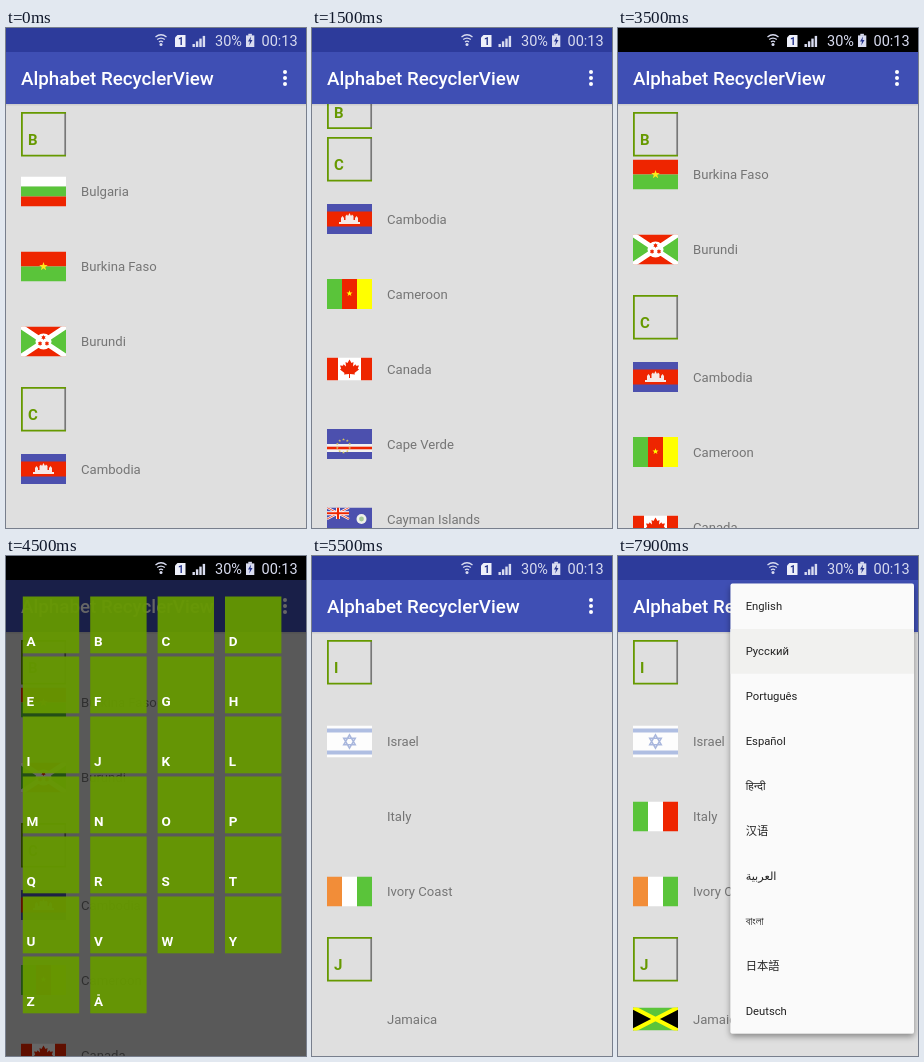
An HTML page that plays this animation: 300x500 px, repeating every 8 s.

```html
<!DOCTYPE html>
<html lang="en">
<head>
<meta charset="utf-8">
<title>Alphabet list</title>
<style>
  html, body { margin: 0; width: 100%; height: 100%; overflow: hidden; background: #dfdfdf; }
  svg { display: block; width: 100vw; height: 100vh; }
  text { font-family: Roboto, "Noto Sans", "Noto Sans CJK SC", "Noto Sans CJK JP", sans-serif; }
  .title { font-size: 18.75px; font-weight: 500; fill: #fff; }
  .country { font-size: 13.125px; fill: #757575; }
  .letter { font-size: 15px; font-weight: 700; fill: #669900; }
  .cell { font-size: 13.5px; font-weight: 700; fill: #fff; }
  .item { font-size: 11.25px; fill: #222; }
  .status { font-size: 14.5px; fill: #d9dcf0; }
</style>
</head>
<body>
<svg id="stage" viewBox="0 0 300 500"></svg>
<script>
const LOOP = 8000, STEP = 100;
const ROW = 75, HEADER = 52.5, LIST_TOP = 76;
const RED = '#ee2500', GREEN = '#5ac43a', BLUE = '#4c50ae', YELLOW = '#ffff00', LIME = '#669900';

const rect = (x, y, w, h, fill, extra = '') =>
  `<rect x="${x}" y="${y}" width="${w}" height="${h}" fill="${fill}" ${extra}/>`;
const path = (d, fill, extra = '') => `<path d="${d}" fill="${fill}" ${extra}/>`;
const circle = (x, y, r, fill, extra = '') => `<circle cx="${x}" cy="${y}" r="${r}" fill="${fill}" ${extra}/>`;
const text = (x, y, cls, str) => `<text x="${x}" y="${y}" class="${cls}">${str}</text>`;
const bands = (h, ...fills) => fills.map((f, i) => rect(0, i * h, 45, h, f)).join('');
const pales = (...fills) => fills.map((f, i) => rect(i * 15, 0, 15, 30, f)).join('');

function star(cx, cy, r, fill, points = 5, inner = 0.4) {
  const at = Array.from({ length: points * 2 }, (_, i) => {
    const a = i * Math.PI / points - Math.PI / 2, d = i % 2 ? r * inner : r;
    return (cx + d * Math.cos(a)).toFixed(2) + ' ' + (cy + d * Math.sin(a)).toFixed(2);
  });
  return path(`M${at.join('L')}Z`, fill);
}
const ring = (n, draw) => Array.from({ length: n }, (_, i) => {
  const a = i * 2 * Math.PI / n - Math.PI / 2;
  return draw(Math.cos(a), Math.sin(a));
}).join('');

// Each flag is 45 wide; the number is its height.
const flags = {
  'Bulgaria': [30, bands(10, '#fff', GREEN, RED)],
  'Burkina Faso': [30, bands(15, RED, GREEN) + star(22.5, 15, 4.5, '#ffe81a')],
  'Burundi': [30, rect(0, 0, 45, 30, RED) + path('M0 0L22.5 15L0 30ZM45 0L22.5 15L45 30Z', GREEN) +
    path('M0 0L45 30M45 0L0 30', 'none', 'stroke="#fff" stroke-width="5"') +
    circle(22.5, 15, 8, '#fff') + ring(3, (x, y) => star(22.5 + 4 * x, 15 + 4 * y, 2.4, RED, 6, 0.58))],
  'Cambodia': [30, rect(0, 0, 45, 30, BLUE) + rect(0, 7.5, 45, 15, RED) +
    path('M12 20V18H14V14L15.5 12L17 14V16H18.5V12L20 10.5L21 12L22.5 9L24 12L25 10.5L26.5 12V16H28V14L29.5 12L31 14V18H33V20Z', '#f6e9e6')],
  'Cameroon': [30, pales(GREEN, RED, YELLOW) + star(22.5, 14.5, 3.2, YELLOW)],
  'Canada': [23, rect(0, 0, 45, 23, '#fff') + rect(0, 0, 11, 23, RED) + rect(34, 0, 11, 23, RED) +
    path('M22.5 2L24.5 5.5L26.5 4.5L26 9L28.5 6.8L29 8.2L32 8L30.8 11L32 12L27.5 15.5L28 17L23 16.5V20.5H22V16.5L17 17L17.5 15.5L13 12L14.2 11L13 8L16 8.2L16.5 6.8L19 9L18.5 4.5L20.5 5.5Z', RED)],
  'Cape Verde': [30, rect(0, 0, 45, 30, BLUE) + rect(0, 15, 45, 8, '#f2f2f2') + rect(0, 17.7, 45, 2.6, RED) +
    ring(10, (x, y) => star(16.5 + 6.5 * x, 17 + 6.5 * y, 1.5, '#d9c95a'))],
  'Cayman Islands': [23, rect(0, 0, 45, 23, BLUE) +
    path('M0 0L22 11.5M22 0L0 11.5', 'none', 'stroke="#fff" stroke-width="2.4"') +
    path('M0 0L22 11.5M22 0L0 11.5', 'none', `stroke="${RED}" stroke-width=".8"`) +
    path('M11 0V11.5M0 5.75H22', 'none', 'stroke="#fff" stroke-width="4"') +
    path('M11 0V11.5M0 5.75H22', 'none', `stroke="${RED}" stroke-width="2.2"`) +
    circle(34.5, 11.5, 5, '#eef0ea') + circle(34.5, 11.5, 2.4, '#a5c89a')],
  'Israel': [32, rect(0, 0, 45, 32, '#fdfdfd') + rect(0, 3, 45, 4, '#afbee2') + rect(0, 25, 45, 4, '#afbee2') +
    path('M22.5 9.3L28.3 19.3H16.7ZM22.5 22.7L28.3 12.7H16.7Z', 'none', 'stroke="#a9b7dd" stroke-width="1.5"')],
  'Italy': [30, pales(GREEN, '#fff', RED)],
  'Ivory Coast': [30, pales('#f28d38', '#fff', GREEN)],
  'Jamaica': [23, rect(0, 0, 45, 23, GREEN) + path('M0 0L22.5 11.5L0 23ZM45 0L22.5 11.5L45 23Z', '#000') +
    path('M0 0L45 23M45 0L0 23', 'none', `stroke="${YELLOW}" stroke-width="4.2"`)],
};

const sections = {
  bc: [['B', ['Bulgaria', 'Burkina Faso', 'Burundi']],
       ['C', ['Cambodia', 'Cameroon', 'Canada', 'Cape Verde', 'Cayman Islands']]],
  ij: [['I', ['Israel', 'Italy', 'Ivory Coast']], ['J', ['Jamaica']]],
};

const flagId = name => 'flag-' + name.replace(/ /g, '');
const row = (name, y) => {
  const [h, art] = flags[name];
  return `<svg id="${flagId(name)}" x="15" y="${y - h / 2}" width="45" height="${h}">${art}</svg>` +
    text(75, y + 4.7, 'country', name);
};
const header = (id, letter) => `<g id="${id}">` + rect(0, 0, 300, HEADER, '#dfdfdf') +
  path('M59.2 8V52', 'none', 'stroke="#777" stroke-width="1.7"') +
  path('M60 8.9H15.9V51.6H60', 'none', `stroke="${LIME}" stroke-width="1.8"`) +
  text(22, 41, 'letter', letter) + '</g>';

// Rows are placed from the centre of the first one; the second header follows the first section.
function list(id) {
  const [[a, first], [b, second]] = sections[id];
  const start = first.length * ROW + HEADER;
  return `<g id="${id}"><g id="${id}-rows">` +
    first.map((n, i) => row(n, i * ROW)).join('') +
    second.map((n, i) => row(n, start + i * ROW)).join('') +
    '</g>' + header(id + '-next', b) + header(id + '-pinned', a) + '</g>';
}

const statusBar = rect(0, 0, 300, 24, '#2d3b9b', 'id="status"') +
  '<g fill="none" stroke="#d9dcf0" stroke-width="1.3">' +
  '<path d="M149.5 9Q155 4.5 160.5 9M151.2 11.6Q155 8.6 158.8 11.6M153 14Q155 12.4 157 14"/></g>' +
  circle(155, 16.6, 1.5, '#d9dcf0') +
  path('M171.5 7H179.5V19H169V9.5Z', '#eef0fa') +
  '<text x="172" y="16.8" font-size="10" font-weight="700" fill="#26348c">1</text>' +
  [0, 1, 2, 3].map(i => rect(186.5 + i * 3.4, 16 - i * 2.7, 2.4, 3 + i * 2.7, '#d9dcf0')).join('') +
  text(209, 18, 'status', '30%') +
  rect(242.3, 5.8, 3.6, 2, '#d9dcf0') + rect(240, 7.4, 8.3, 11.6, '#d9dcf0') +
  path('M245 8.5L242 13.5H244L243.2 17.5L246.5 12H244.5Z', '#26348c') +
  text(255.5, 18, 'status', '00:13');

const toolbar = rect(0, 76, 300, 1.5, '#000', 'opacity=".08"') + rect(0, 24, 300, 52, '#3f4fb4') +
  text(15, 57, 'title', 'Alphabet RecyclerView') +
  [44, 50, 56].map(y => circle(279, y, 2, '#fff')).join('');

const cells = [...'ABCDEFGHIJKLMNOPQRSTUVWYZÅ'].map((c, i) => {
  const x = 16.8 + i % 4 * 67.4, y = 40.5 + Math.floor(i / 4) * 60;
  return rect(x, y, 56.4, 56.8, LIME, 'fill-opacity=".94"') + text(x + 3.8, y + 49.3, 'cell', c);
}).join('');

const languages = ['English', 'Русский', 'Português', 'Español', 'हिन्दी', '汉语', 'العربية', 'বাংলা', '日本語', 'Deutsch'];
const menu = rect(112.5, 27.5, 183.5, 450, '#fafafa', 'rx="2" filter="url(#shadow)"') +
  rect(112.5, 73, 183.5, 44.7, '#f1f1ef') +
  languages.map((s, i) => text(127.7, 54 + i * 45, 'item', s)).join('');

const stage = document.getElementById('stage');
stage.innerHTML = '<defs><filter id="shadow" x="-10%" y="-10%" width="120%" height="120%">' +
  '<feDropShadow dx="0" dy="3" stdDeviation="3" flood-opacity=".4"/></filter></defs>' +
  rect(0, 0, 300, 500, '#dfdfdf') + list('bc') + list('ij') +
  rect(296, 0, 4, 8.5, '#a6a6a6', 'id="thumb"') + toolbar +
  rect(0, 24, 300, 476, '#000', 'id="dim"') + statusBar +
  `<g id="dialog">${cells}</g><g id="menu">${menu}</g>`;

// Time / value tables, linear between entries.
const scroll = [[600, 163.5], [700, 135], [800, 55], [900, -15], [1000, -57], [1100, -79], [1200, -86.5],
  [1500, -86.5], [2300, 34], [2400, 45], [2500, 49], [2600, 49], [2900, 71.5]];
const thumbFade = [[600, 0], [700, 1], [1200, 1], [1500, 0], [1600, 1], [3000, 1], [3300, 0]];
const dialogFade = [[3600, 0], [3900, 1], [5200, 1], [5500, 0]];
const menuFade = [[7000, 0], [7300, 1]];
const menuGrow = [[7000, 0.8], [7200, 0.94], [7400, 1]];
const flagFade = { 'Italy': [[5500, 0], [5700, 1]], 'Jamaica': [[5600, 0], [5900, 1]] };

function sample(table, t) {
  const i = table.findIndex(([time]) => time > t);
  if (i === 0) return table[0][1];
  if (i < 0) return table[table.length - 1][1];
  const [t0, v0] = table[i - 1], [t1, v1] = table[i];
  return v0 + (v1 - v0) * (t - t0) / (t1 - t0);
}

const set = (id, name, value) => document.getElementById(id).setAttribute(name, value);
const moveY = (id, y) => set(id, 'transform', `translate(0 ${y})`);
const scaleAt = (id, x, y, k) => set(id, 'transform', `translate(${x} ${y}) scale(${k}) translate(${-x} ${-y})`);

function placeList(id, y) {
  const next = y + (sections[id][0][1].length - 0.5) * ROW;
  moveY(id + '-rows', y);
  moveY(id + '-next', Math.max(next, LIST_TOP));
  moveY(id + '-pinned', Math.min(LIST_TOP, next - HEADER));
}

function render(t) {
  const y = sample(scroll, t), jumped = t >= 5300;
  placeList('bc', y);
  placeList('ij', 185.5);
  set('bc', 'visibility', jumped ? 'hidden' : 'visible');
  set('ij', 'visibility', jumped ? 'visible' : 'hidden');
  for (const name in flagFade) set(flagId(name), 'opacity', sample(flagFade[name], t));

  set('thumb', 'y', 136 + (34 - y) / 45);
  set('thumb', 'opacity', sample(thumbFade, t));
  set('status', 'fill', t >= 3500 && t < 5400 ? '#000' : '#2d3b9b');

  const shown = sample(dialogFade, t);
  set('dim', 'opacity', 0.6 * shown);
  set('dialog', 'opacity', shown);
  scaleAt('dialog', 150, 250, 0.92 + 0.08 * shown);

  set('menu', 'opacity', sample(menuFade, t));
  scaleAt('menu', 296, 27, sample(menuGrow, t));
}

function tick() {
  render(Math.floor(performance.now() % LOOP / STEP) * STEP);
  requestAnimationFrame(tick);
}
tick();
</script>
</body>
</html>
```
